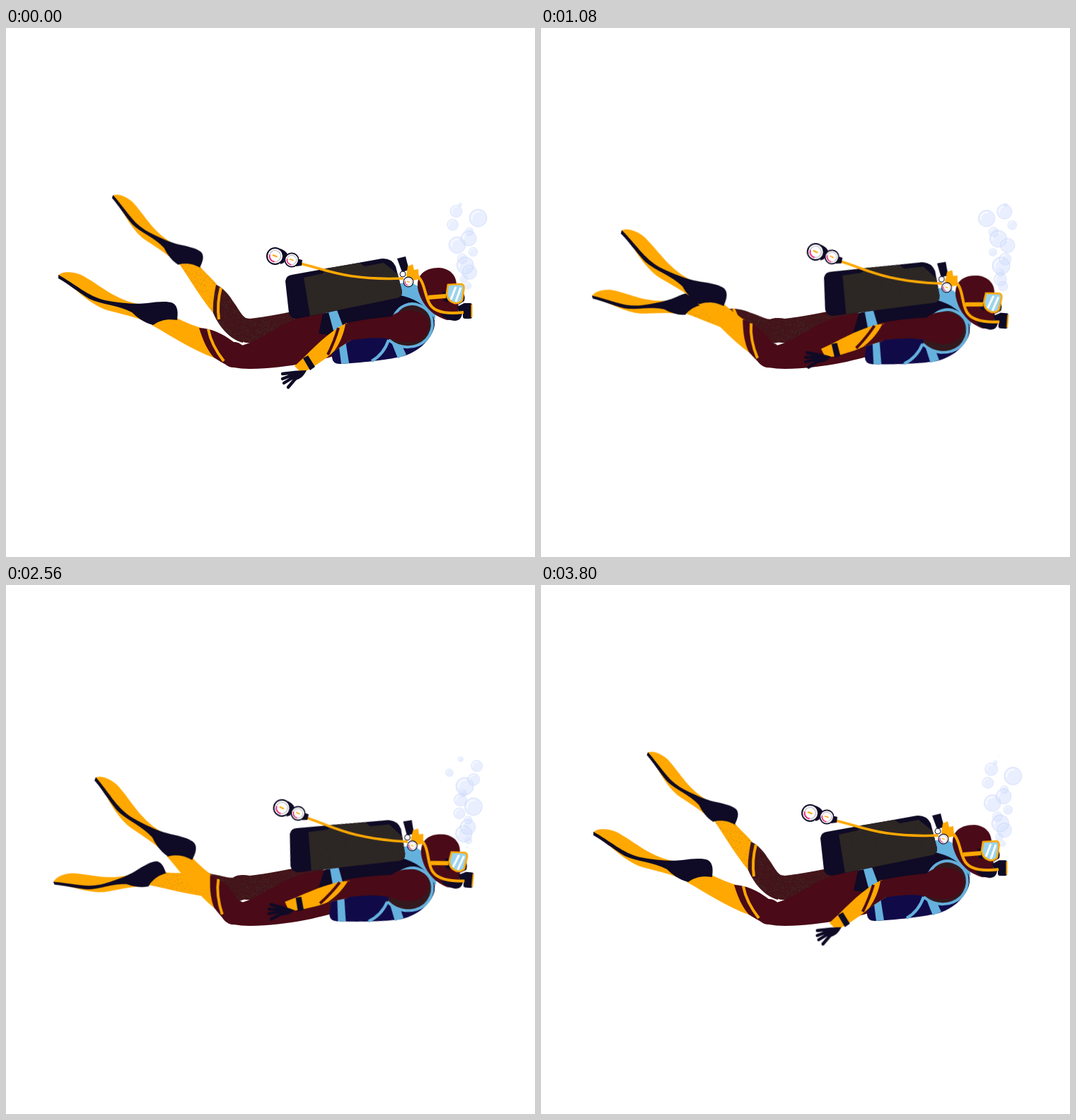
Animation of 748 by 748 pixels, one loop 3840 ms. Source, as an HTML page:

```html
<!DOCTYPE html>
<html lang="en">
<head>
<meta charset="utf-8">
<title>Diver</title>
<style>
  html, body { margin: 0; width: 100%; height: 100%; overflow: hidden; background: #fff; }
  svg { display: block; width: 100vw; height: 100vh; }
  .gold { fill: #ffa802; }
  .ink { fill: #0f0a25; }
  .suit { fill: #4a0a17; }
  .navy { fill: #100a49; }
  .sky { fill: #65b1de; }
  .line { fill: none; stroke: #ffa802; stroke-width: 4; }
  .pipe { fill: none; stroke: #65b1de; stroke-width: 4; }

  .swing { animation: 1.92s cubic-bezier(.364, 0, .636, 1) infinite alternate; }
  .sway { animation: 1.92s cubic-bezier(.32, .12, .68, .88) infinite alternate; }
  #farShin { transform-origin: 335px 432px; animation-name: farKick; }
  #nearShin { transform-origin: 322px 462px; animation-name: nearKick; }
  #torso { transform-origin: 465px 425px; animation-name: tilt; }
  #arm, #forearm { transform-origin: 478px 428px; }
  #arm { animation-name: level; }
  #forearm { animation-name: stroke; }
  @keyframes farKick { to { transform: rotate(-59deg); } }
  @keyframes nearKick { to { transform: rotate(26.4deg); } }
  @keyframes tilt { to { transform: rotate(7.3deg); } }
  @keyframes level { to { transform: translateY(-3px) rotate(-4deg); } }
  @keyframes stroke { to { transform: rotate(27deg); } }

  #bubbles use { animation: rise 3.84s linear infinite, swell 3.84s linear infinite; }
  @keyframes rise { from { translate: 652px 374px; } to { translate: var(--x) 240px; } }
  @keyframes swell { 0%, 100% { scale: 0; } 12%, 85% { scale: var(--size); } }
</style>
</head>
<body>
<svg viewBox="0 0 748 748">
  <defs>
    <g id="bubble">
      <circle r="10" fill="#cbd8fd" fill-opacity=".42" stroke="#b4c4f6" stroke-opacity=".4" stroke-width=".8"/>
      <path d="M-7 1A7 7 0 0 1 1 -7" fill="none" stroke="#fff" stroke-opacity=".6" stroke-width="2" stroke-linecap="round"/>
    </g>
    <g id="dial">
      <circle r="11.5" fill="#fff" stroke="#0f0a25" stroke-width="2"/>
      <circle r="8" fill="none" stroke="#b9b2bd" stroke-width="1.2"/>
      <path d="M-7.7 -2A8 8 0 0 0 -1 8" fill="none" stroke="#e8156b" stroke-width="1.8"/>
      <path d="M-3.5 -1.5L3 1" stroke="#ffa802" stroke-width="2"/>
    </g>
    <g id="fin">
      <path class="gold" d="M74 350C80 343 96 345 106 349C130 361 150 382 185 390L215 400L208 420C185 408 160 404 140 398C115 388 95 366 74 350Z"/>
      <path class="ink" d="M74 349C98 362 115 379 140 385C160 389 185 391 200 389C215 387 228 386 236 389C244 394 243 404 242 413C228 411 218 413 208 420C195 417 184 408 178 402C160 392 135 391 118 383C100 372 88 362 74 354Z"/>
    </g>
  </defs>

  <g id="bubbles"></g>

  <g id="farShin" class="swing">
    <path fill="url(#goldGrain)" d="M246 335C262 358 280 390 301 412L299 364C290 352 283 348 275 338L268 324L242 324Z"/>
    <path fill="url(#suitGrain)" d="M297 363C294 378 292 393 293 403C300 420 315 440 335 445L345 412C335 412 330 398 320 385C314 375 305 366 297 363Z"/>
    <path class="line" d="M304 367C300 382 299 397 301 412"/>
    <use href="#fin" transform="translate(151 237) rotate(19) scale(.89) translate(-74 -350)"/>
  </g>
  <path fill="url(#suitGrain)" d="M322 413Q330 408 345 411C370 408 395 403 410 400H450L440 425C400 430 360 448 340 445C325 443 318 425 322 413Z"/>

  <path class="suit" d="M333 449C360 442 385 420 412 411C430 405 450 403 480 400L490 455C450 470 400 481 345 482C336 482 329 481 322 480A18 18 0 0 1 322 444Z"/>
  <g id="nearShin" class="swing">
    <path class="gold" d="M206 420C235 436 262 455 296 467L276 424C262 420 252 415 243 411L225 400Z"/>
    <path class="suit" d="M273 424C278 440 284 455 294 466C303 472 312 477 322 480A18 18 0 0 0 322 444C305 431 290 425 273 424Z"/>
    <path class="line" d="M286 426C289 442 297 457 308 471"/>
    <use href="#fin"/>
  </g>

  <g id="torso" class="sway">
    <path class="ink" d="M448 404L560 376L590 378C600 390 606 405 606 420C604 438 585 455 560 464L520 445L442 432Z"/>
    <path class="navy" d="M462 440L461 466Q462 476 474 475C510 473 545 468 562 464C590 455 606 435 606 412L560 430Z"/>
    <path class="sky" d="M456 402L468 399L477 423L463 428ZM470 443L480 442L485 474L474 475ZM546 447L558 445L566 462L554 467Z"/>
    <path class="sky" d="M556 362C575 355 590 368 600 384C606 394 608 402 607 412L601 405C592 390 575 382 558 378Z"/>
    <path class="pipe" d="M541 441C536 456 526 466 517 471"/>
    <path class="pipe" style="fill:#33191d" d="M549 407C556 392 572 387 584 392C606 400 608 425 594 441C580 454 558 455 541 441"/>

    <path class="suit" d="M583 372C578 350 592 339 612 339C630 340 638 352 637 366L640 395C640 405 634 413 624 413C606 408 590 395 583 372Z"/>
    <path class="ink" d="M614 405L645 399Q646 414 634 414Q622 413 614 405ZM617 373L624 372L625 388L619 386ZM645 373Q650 378 648 386L640 391ZM638 394L648 389L650 400L640 401Z"/>
    <path class="line" style="stroke-width:6" d="M597 381L622 379"/>
    <path d="M625 363L644 362Q649 363 647 372L645 385Q641 390 634 389Q624 386 623 376Z" fill="#9bd3ec" stroke="#ffa802" stroke-width="2.6"/>
    <path d="M629 384L636 366M636 387L643 367" stroke="#fff" stroke-width="3"/>
    <rect class="ink" x="646" y="389" width="13" height="22" rx="3"/>
    <path class="line" style="stroke-width:2" d="M658.5 391V409"/>
    <path class="line" d="M573 348C592 350 590 372 598 388C604 402 622 405 647 402"/>

    <path class="ink" d="M395 358Q396 350 404 349L526 327Q544 323 551 337L560 372Q561 380 552 382L412 411Q403 412 400 403Z"/>
    <path fill="url(#tankGrain)" d="M421 353L448 347L452 340L500 332L507 337L534 332L554 348L560 372Q561 380 552 382L430 407Z"/>
    <path class="ink" d="M553 326L565 323L567 331L570 342L560 345Z"/>
    <path class="gold" d="M568 337L575 334L577 342L583 341L584 355L572 358L566 350Z"/>
    <circle cx="561" cy="348" r="4" fill="#fff" stroke="#0f0a25"/>
    <path class="line" style="stroke-width:3.5" d="M416 333C455 342 480 357 562 354"/>
    <path class="ink" d="M388 312Q396 315 398 320L393 332L388 334ZM411 326L419 328L418 336L410 337Z"/>
    <use href="#dial" transform="translate(380.5 322.5)"/>
    <use href="#dial" transform="translate(404 328) scale(.84)"/>
    <use href="#dial" transform="translate(569 359) scale(.6)"/>

    <g id="arm" class="sway">
      <path class="suit" d="M478 418C505 412 525 410 545 408C556 398 580 395 594 408C602 420 596 436 583 442C570 447 556 443 545 440C520 436 500 440 478 443Q464 440 478 418Z"/>
      <g id="forearm" class="sway">
        <path class="gold" d="M482 417C462 426 445 442 421 466L408 478L418 488L432 481C445 472 455 466 464 457L488 441Z"/>
        <path class="suit" d="M480 418C478 432 472 446 464 457L488 441L492 418Z"/>
        <path d="M470 424C466 438 461 450 455 462" fill="none" stroke="#4a0a17" stroke-width="4"/>
        <path class="ink" d="M420 467L427 463L437 479L430 484ZM402 488C407 483 416 485 425 484C421 493 413 499 406 498Z"/>
        <path d="M409 487L391 489M407 490L391 496M406 494L393 502M410 495L399 508" fill="none" stroke="#0f0a25" stroke-width="4.4" stroke-linecap="round"/>
      </g>
    </g>
  </g>
</svg>
<script>
  const NS = "http://www.w3.org/2000/svg";

  function add(parent, tag, attrs) {
    const el = document.createElementNS(NS, tag);
    for (const key in attrs) el.setAttribute(key, attrs[key]);
    return parent.appendChild(el);
  }

  let seed = 7;
  const random = () => (seed = (seed * 16807) % 2147483647) / 2147483647;

  // A flat colour with fine speckle, usable as a fill.
  function grain(id, base, dot, opacity) {
    const size = 64;
    const tile = add(document.querySelector("defs"), "pattern", { id, width: size, height: size, patternUnits: "userSpaceOnUse" });
    add(tile, "rect", { width: size, height: size, fill: base });
    for (let i = 0; i < 400; i++) {
      add(tile, "circle", { cx: random() * size, cy: random() * size, r: .45 + random() * .3, fill: dot, "fill-opacity": opacity });
    }
  }
  grain("suitGrain", "#431419", "#3a332c", .75);
  grain("goldGrain", "#ffa802", "#8a6a20", .3);
  grain("tankGrain", "#2d2724", "#1c1626", .4);

  // Evenly staggered bubbles that fan out as they rise.
  const count = 14;
  for (let i = 0; i < count; i++) {
    const bubble = add(document.getElementById("bubbles"), "use", { href: "#bubble" });
    bubble.style.setProperty("--x", 647 + 26 * Math.sin(i * 2.4) + "px");
    bubble.style.setProperty("--size", .9 + .35 * Math.cos(i * 1.7));
    bubble.style.animationDelay = -3.84 * i / count + "s";
  }
</script>
</body>
</html>
```
